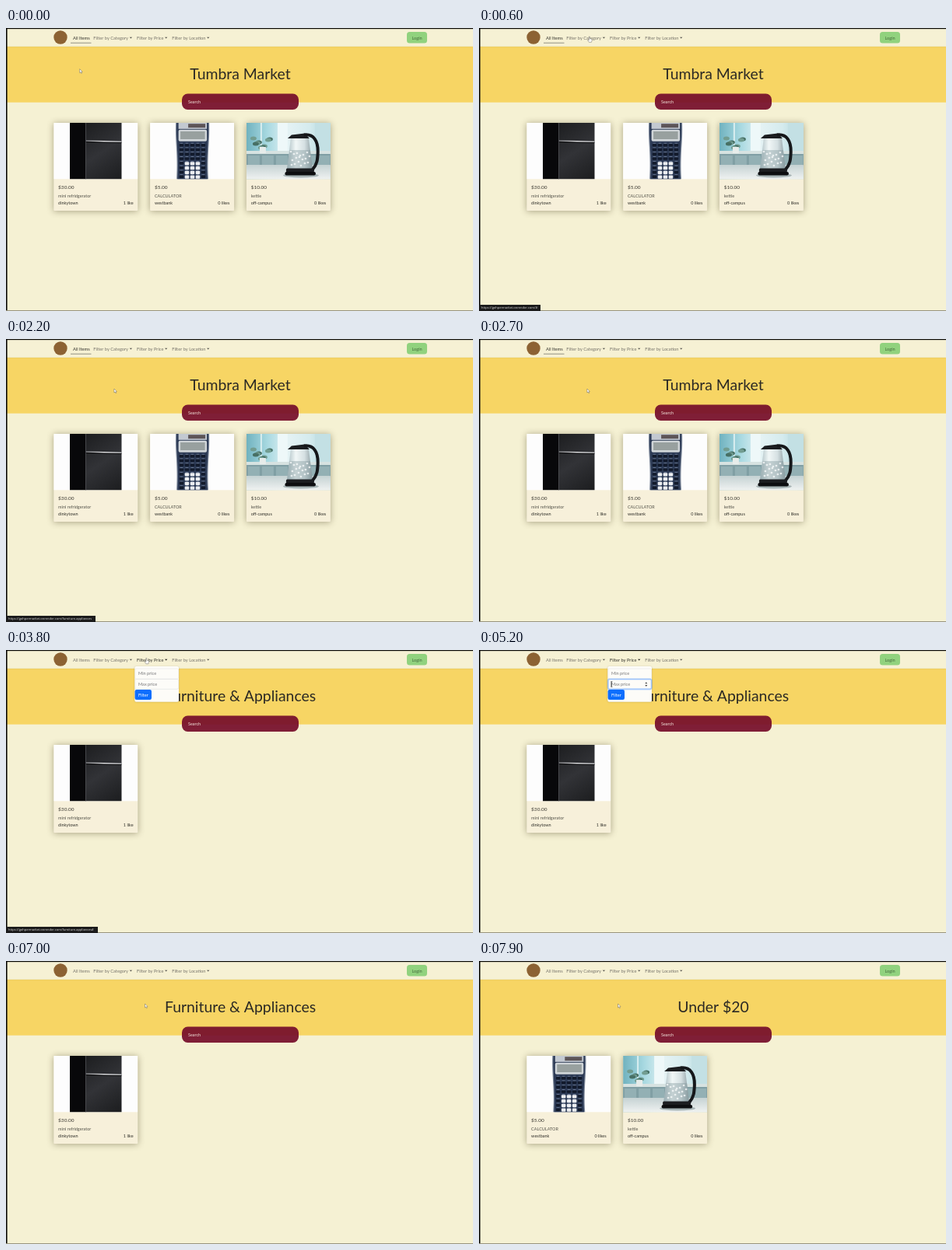
Write an HTML page with a canvas that moves like this. It is 600x364 px and loops after 8 s.

```html
<!DOCTYPE html>
<html lang="en">
<head>
<meta charset="utf-8">
<title>Tumbra Market</title>
<style>
html, body { margin: 0; width: 100%; height: 100%; overflow: hidden; background: #f5f0d2; }
canvas { display: block; width: 600px; height: 364px; }
</style>
</head>
<body>
<canvas id="stage"></canvas>
<script>
const W = 600, H = 364, LOOP = 8000, STEP = 100;
const canvas = document.getElementById('stage');
const ctx = canvas.getContext('2d');
const ratio = window.devicePixelRatio || 1;
canvas.width = W * ratio;
canvas.height = H * ratio;

const FACE = 'Lato, "Open Sans", sans-serif';
const SITE = 'https://gohpermarket.onrender.com/';
const INK = '#3d3b33', SOFT = '#76736a';
const CATEGORIES = ['Textbooks', 'School Supplies', 'Electronics',
  'Furniture/Appliances', 'Clothing', 'Kitchenware'];

const fridge = { price: '$30.00', name: 'mini refridgerator', place: 'dinkytown', likes: '1 like', draw: drawFridge };
const calculator = { price: '$5.00', name: 'CALCULATOR', place: 'westbank', likes: '0 likes', draw: drawCalculator };
const kettle = { price: '$10.00', name: 'kettle', place: 'off-campus', likes: '0 likes', draw: drawKettle };

const PAGES = [
  { from: 0, title: 'Tumbra Market', items: [fridge, calculator, kettle] },
  { from: 2900, title: 'Furniture & Appliances', items: [fridge] },
  { from: 7500, title: 'Under $20', items: [calculator, kettle] }
];

// time, x, y of the pointer's hot spot
const PATH = [
  [0, 94.7, 52.7], [200, 94.7, 52.7], [600, 141, 11], [900, 141, 11], [1200, 142.5, 25],
  [1700, 139.5, 62], [2200, 138.9, 64], [3000, 138.9, 64], [3600, 179.5, 10.5],
  [4000, 179.5, 10.5], [4500, 170.3, 40.5], [5900, 170.3, 40.5], [6300, 178.5, 55], [LOOP, 178.5, 55]
];
const POINTERS = [[0, 'arrow'], [500, 'hand'], [1900, 'arrow'], [3500, 'hand'], [4100, 'arrow'],
  [4400, 'beam'], [6100, 'hand'], [6700, 'arrow']];
const STATUS = [[0, '', 0], [500, '#', 79], [1500, 'furniture-appliances', 115], [2700, '', 0],
  [3700, 'furniture-appliances#', 118], [4400, '', 0]];

const within = (t, a, b) => t >= a && t < b;
const latest = (list, t) => list.filter(e => e[0] <= t).pop();

function rect(x, y, w, h, color) {
  ctx.fillStyle = color;
  ctx.fillRect(x, y, w, h);
}

function box(x, y, w, h, r, color) {
  ctx.beginPath();
  ctx.roundRect(x, y, w, h, r);
  ctx.fillStyle = color;
  ctx.fill();
}

function outline(x, y, w, h, r, color, width) {
  ctx.beginPath();
  ctx.roundRect(x, y, w, h, r);
  ctx.strokeStyle = color;
  ctx.lineWidth = width;
  ctx.stroke();
}

function poly(points, color) {
  ctx.beginPath();
  points.forEach(([x, y]) => ctx.lineTo(x, y));
  ctx.closePath();
  ctx.fillStyle = color;
  ctx.fill();
}

function disc(x, y, rx, ry, color) {
  ctx.beginPath();
  ctx.ellipse(x, y, rx, ry, 0, 0, 7);
  ctx.fillStyle = color;
  ctx.fill();
}

function text(s, x, y, size, color, align = 'left', weight = 400, face = FACE) {
  ctx.font = `${weight} ${size}px ${face}`;
  ctx.textAlign = align;
  ctx.fillStyle = color;
  ctx.fillText(s, x, y);
}

function shade(x0, y0, x1, y1, ...colors) {
  const g = ctx.createLinearGradient(x0, y0, x1, y1);
  colors.forEach((c, i) => g.addColorStop(i / (colors.length - 1), c));
  return g;
}

function shadowed(color, blur, dy, draw) {
  ctx.save();
  ctx.shadowColor = color;
  ctx.shadowBlur = blur * ratio;
  ctx.shadowOffsetY = dy * ratio;
  draw();
  ctx.restore();
}

// Item pictures are drawn in a 108 x 72.5 area.
function drawFridge() {
  rect(0, 0, 108, 72.5, '#fdfdfd');
  rect(20.7, 0, 20.5, 72.5, '#08080a');
  rect(41, 0, 46.2, 72.5, shade(41, 0, 88, 72, '#1d1e20', '#323337', '#1c1d1f'));
  rect(40.8, 0, 0.8, 72.5, '#48494d');
  poly([[41.5, 24], [87, 25], [87, 26], [41.5, 25]], '#0a0a0b');
  poly([[41.5, 22.4], [87, 23.6], [87, 25], [41.5, 23.8]], shade(41, 0, 87, 0, '#8d8e92', '#e4e4e6', '#b4b5b8'));
}

function calculatorShape(inset) {
  ctx.beginPath();
  ctx.moveTo(33 + inset, 0);
  ctx.lineTo(76 - inset, 0);
  ctx.bezierCurveTo(77 - inset, 25, 73 - inset, 40, 75 - inset, 72.5);
  ctx.lineTo(34 + inset, 72.5);
  ctx.bezierCurveTo(36 + inset, 40, 32 + inset, 25, 33 + inset, 0);
}

function drawCalculator() {
  rect(0, 0, 108, 72.5, '#fdfdfd');
  calculatorShape(0);
  ctx.fillStyle = '#7c8799';
  ctx.fill();
  calculatorShape(1.2);
  ctx.fillStyle = '#2c3a55';
  ctx.fill();
  rect(36.5, 0, 36.5, 7.8, '#c3c9d1');
  rect(49, 1.2, 22, 5, '#5d5558');
  box(36.5, 8.8, 36.5, 15, 2, '#d0d5d8');
  rect(39, 11, 31.5, 10, '#98a09f');
  for (let row = 0; row < 8; row++)
    for (let col = 0; col < 5; col++) {
      const number = row > 3 && col > 0 && col < 4;
      const y = 27 + row * 5.8;
      rect(38.5 + col * 7, y - 1.2, 3.6, 0.7, '#7e8ca5');
      box(37.6 + col * 7, y, 5.5, number ? 4.2 : 3.4, 1, number ? '#eceef1' : '#121a2b');
    }
}

function drawKettle() {
  rect(0, 0, 108, 72.5, shade(0, 0, 108, 0, '#70b2bf', '#a8d9e1', '#e4f2f4', '#d5ebee', '#abd3d8'));
  rect(18, 0, 2, 36, '#d9eef0');
  rect(40, 0, 13, 36, '#eef8f9');
  rect(88, 0, 20, 36, '#c3e0e4');
  rect(0, 36, 108, 4, '#d6e2e1');
  rect(0, 40, 108, 15, '#809fa4');
  for (let x = 2; x < 108; x += 18) rect(x, 42, 15, 12, '#93b0b4');
  for (let i = 0; i < 9; i++)
    disc(9 + (i * 7) % 23, 20 + (i * 5) % 14, 4, 2.5, i % 2 ? '#477065' : '#729d91');
  rect(17, 31, 8, 8, '#e6ecea');
  rect(0, 54, 108, 18.5, shade(0, 54, 0, 72, '#c5d2d3', '#eef1f0'));
  disc(70, 67.5, 23, 3, '#a8b5b6');

  poly([[57, 19], [80, 19], [85, 60], [52, 60]], shade(52, 0, 86, 0, '#a9bcc1', '#f1f7f7', '#d5e0e2', '#84959a'));
  poly([[55.5, 35], [82, 35], [85, 60], [52, 60]], 'rgba(128,150,156,.4)');
  for (let i = 0; i < 18; i++)
    disc(57 + (i * 11) % 25, 37 + (i * 7) % 19, 1.4, 1.3, 'rgba(250,253,253,.75)');
  poly([[53, 20], [58, 15.5], [75, 13.5], [81, 20]], '#1b1d20');
  ctx.strokeStyle = '#15171a';
  ctx.lineWidth = 4;
  ctx.lineJoin = 'round';
  ctx.beginPath();
  ctx.moveTo(74, 15.5);
  ctx.bezierCurveTo(87, 14, 92, 24, 91.8, 37);
  ctx.bezierCurveTo(91.5, 47, 91, 53, 85, 60);
  ctx.stroke();
  box(51, 58.5, 36, 5, 1.5, '#1b1d20');
  box(49.5, 63, 39.5, 4.5, 2, '#0d0e10');
}

function drawCard(item, i) {
  const x = 61.3 + i * 123.8, y = 122;
  shadowed('rgba(60,50,20,.42)', 9, 0.8, () => box(x, y, 108, 113, 1, '#f7f0da'));
  ctx.save();
  ctx.translate(x, y);
  ctx.beginPath();
  ctx.rect(0, 0, 108, 72.5);
  ctx.clip();
  item.draw();
  ctx.restore();
  text(item.price, x + 5.8, 207.2, 6.5, INK);
  text(item.name, x + 5.8, 218, 5.5, '#55534a');
  text(item.place, x + 5.8, 226.8, 5.5, '#2f2e28');
  text(item.likes, x + 102.3, 226.8, 5.5, '#2f2e28', 'right');
}

function navLink(label, x, arrowX, active) {
  const color = active ? '#33322c' : SOFT;
  text(label, x, 14.7, 5.7, color);
  if (arrowX) poly([[arrowX, 11.7], [arrowX + 3.4, 11.7], [arrowX + 1.7, 13.5]], active ? '#1d1c18' : '#55534c');
}

function drawPage(t, page) {
  rect(0, 0, W, H, '#f5f1d3');
  rect(0, 23.7, W, 72, '#f7d564');
  shadowed('rgba(90,80,30,.12)', 2, 0.4, () => rect(0, 0, W, 23.6, '#f6f1d4'));
  disc(70, 12, 8.7, 8.7, '#8c6233');

  const home = page === PAGES[0];
  navLink('All Items', 86, 0, home);
  if (home) rect(83, 18.8, 26.5, 0.7, '#6b695f');
  navLink('Filter by Category', 112.3, 158.7, within(t, 800, 1900));
  navLink('Filter by Price', 168, 204, within(t, 3700, 6600));
  navLink('Filter by Location', 213.2, 258, false);
  box(515, 5, 26, 14.5, 3.5, '#91d27e');
  text('Login', 528, 14.6, 5.6, '#456b3d', 'center');

  text(page.title, 301, 65.6, 19.4, '#2b2924', 'center');
  box(226, 84.6, 150, 20.3, 7.5, 'rgba(119,14,42,.93)');
  text('Search', 234, 97, 5.5, '#f3e6df');
  page.items.forEach(drawCard);
}

function panel(x, y, w, h) {
  shadowed('rgba(60,50,20,.25)', 2, 0.3, () => box(x, y, w, h, 2, '#fdfcf8'));
}

function categoryMenu() {
  panel(110, 21, 62, 75);
  CATEGORIES.forEach((name, i) => text(name, 115.7, 31.3 + i * 11.55, 5.55, '#45433d'));
}

function priceMenu(t) {
  panel(165.3, 21, 56.7, 45.7);
  outline(165.7, 24, 56, 13.2, 2, '#dedfe0', 0.5);
  text('Min price', 170, 32.4, 5.6, '#77777a');
  const focused = t >= 4800;
  if (focused) outline(165.7, 37.5, 56, 12.8, 2, 'rgba(13,110,253,.25)', 2.2);
  outline(165.7, 37.5, 56, 12.8, 2, focused ? '#86b7fe' : '#dedfe0', 0.6);
  const typed = '20'.slice(0, t < 5600 ? 0 : t < 5800 ? 1 : 2);
  text(typed || 'Max price', 170, 46, 5.6, typed ? '#212529' : '#77777a');
  if (focused) {
    poly([[213.3, 43.2], [216.3, 43.2], [214.8, 41.2]], '#444');
    poly([[213.3, 45], [216.3, 45], [214.8, 47]], '#444');
    if (t % 1000 < 500) rect(169.6 + typed.length * 3.2, 41, 0.5, 6, '#212529');
  }
  box(165.6, 51, 21.4, 13, 2.2, '#0d6efd');
  text('Filter', 176.3, 59.5, 5.6, '#fff', 'center');
}

function drawStatus(t) {
  const [, tail, w] = latest(STATUS, t);
  if (!w) return;
  rect(0, 356, w, 8, '#1b1b1b');
  text(SITE + tail, 3, 361.4, 4, '#e4e4e4', 'left', 400, '"Open Sans", "Noto Sans", sans-serif');
}

function pointerAt(t) {
  const i = PATH.findIndex(p => p[0] > t);
  const a = PATH[i - 1], b = PATH[i];
  let k = (t - a[0]) / (b[0] - a[0]);
  k = k * k * (3 - 2 * k);
  return [a[1] + (b[1] - a[1]) * k, a[2] + (b[2] - a[2]) * k];
}

function drawPointer(t) {
  const [x, y] = pointerAt(t), kind = latest(POINTERS, t)[1];
  ctx.save();
  ctx.translate(x, y);
  ctx.strokeStyle = '#6a665c';
  ctx.lineWidth = 0.5;
  ctx.lineJoin = 'round';
  if (kind === 'arrow') {
    poly([[0, 0], [0, 5], [1.2, 4], [2, 5.8], [2.8, 5.4], [2, 3.7], [3.5, 3.6]], '#fff');
    ctx.stroke();
  } else if (kind === 'hand') {
    poly([[0.3, 0], [1.3, 0], [1.5, 2.7], [4, 3.2], [4.1, 5.2], [3.4, 7.3], [0.4, 7.3],
      [-1.4, 4.8], [-1, 4], [0.3, 4.8]], '#fff');
    ctx.stroke();
  } else {
    rect(-0.3, 0, 0.6, 7, '#3a3a3a');
    rect(-1.2, 0, 2.4, 0.5, '#3a3a3a');
    rect(-1.2, 6.6, 2.4, 0.5, '#3a3a3a');
  }
  ctx.restore();
}

function render(t) {
  ctx.setTransform(ratio, 0, 0, ratio, 0, 0);
  drawPage(t, PAGES.filter(p => p.from <= t).pop());
  if (within(t, 800, 1900)) categoryMenu();
  if (within(t, 3700, 6600)) priceMenu(t);
  rect(0, 0, W, 1.2, '#0b0b08');
  rect(0, 0, 1.6, H, '#0b0b08');
  rect(0, 363, W, 1, '#98947f');
  drawStatus(t);
  drawPointer(t);
}

const start = performance.now();
function tick() {
  const t = (performance.now() - start) % LOOP;
  render(Math.floor(t / STEP) * STEP);
  requestAnimationFrame(tick);
}
tick();
</script>
</body>
</html>
```
